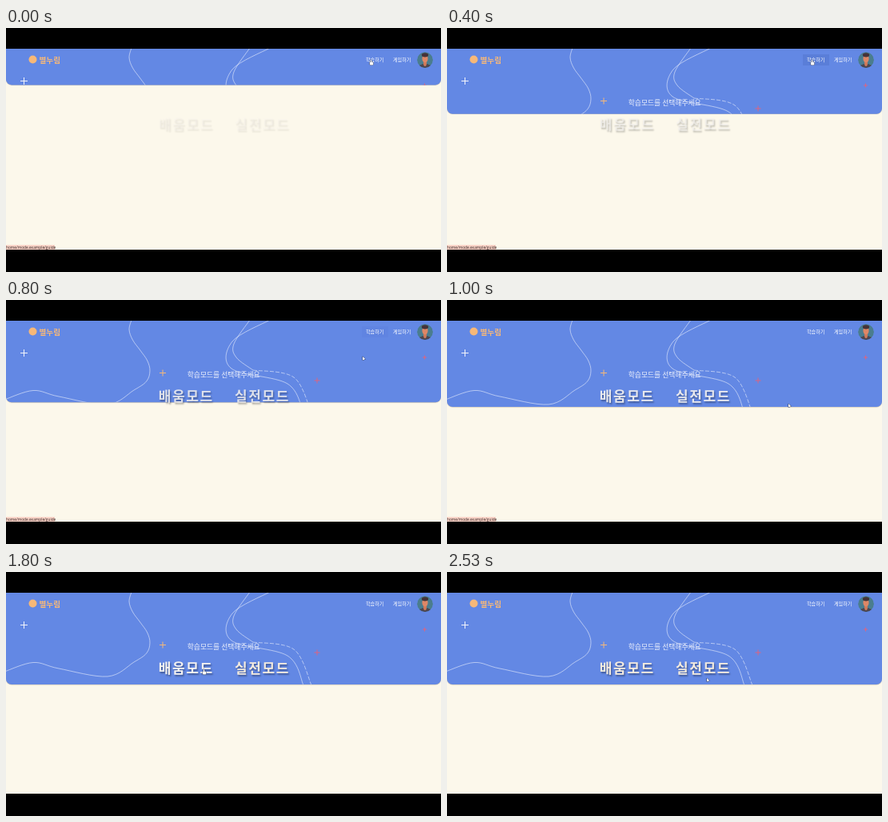
These frames come from a looping animation (544x306 px, 2.59 s). An HTML page with a canvas:

```html
<!DOCTYPE html>
<html lang="ko">
<head>
<meta charset="utf-8">
<style>
html, body { margin: 0; width: 100%; height: 100%; overflow: hidden; background: #000; }
canvas { display: block; width: 544px; height: 306px; }
</style>
</head>
<body>
<canvas id="stage" width="544" height="306"></canvas>
<script>
const ctx = document.getElementById('stage').getContext('2d');
const LOOP = 2590, STEP = 200 / 3;
const FONT = '"Noto Sans CJK KR", "Noto Sans CJK", "Noto Sans", sans-serif';
const CREAM = '#fcf8eb', BLUE = '#6388e4', ORANGE = '#f7b878', RED = '#dc6480';

// Upper part of the left line: one half wave running down the panel
const wave = Array.from({ length: 7 }, (_, i) => {
  const y = 24 + 13 * i;
  return [167 - 13 * Math.cos((y - 36) / 52 * Math.PI), y];
});
const leftTrail = [...wave, [160, 113], [127, 131], [66, 121], [34, 113.5], [-2, 125]];
const innerTrail = [[330, 25], [283, 52], [282, 86], [352, 105], [372, 142]];
const outerTrail = [[305, 25], [285, 55], [288, 72], [309, 88]];
const dashedTrail = [[309, 88], [360, 97], [382, 142]];

// The pointer glides to each stop and arrives at the given time
const GLIDE = 330;
const stops = [
  { at: 0, x: 456, y: 40 },
  { at: 1000, x: 427, y: 130 },
  { at: 1400, x: 335, y: 126 },
  { at: 1800, x: 247, y: 122 },
  { at: 2400, x: 325, y: 133 },
];

const ramp = (t, from, length) => Math.max(0, Math.min(1, (t - from) / length));
const smooth = v => v * v * (3 - 2 * v);
const lerp = (a, b, k) => a + (b - a) * k;

// CSS "ease": cubic-bezier(.25, .1, .25, 1)
function ease(x) {
  if (x >= 1) return 1;
  const bezier = (a, b, u) => 3 * a * u * (1 - u) ** 2 + 3 * b * u * u * (1 - u) + u ** 3;
  let lo = 0, hi = 1;
  for (let i = 0; i < 24; i++) {
    const mid = (lo + hi) / 2;
    if (bezier(.25, .25, mid) < x) lo = mid; else hi = mid;
  }
  return bezier(.1, 1, lo);
}

function disc(x, y, rx, ry, color) {
  ctx.fillStyle = color;
  ctx.beginPath();
  ctx.ellipse(x, y, rx, ry, 0, 0, Math.PI * 2);
  ctx.fill();
}

function text(str, x, y, size, color, weight = 400) {
  ctx.font = `${weight} ${size}px ${FONT}`;
  ctx.fillStyle = color;
  ctx.fillText(str, x, y);
}

// Smooth line through all points (Catmull-Rom)
function trail(points, dash = []) {
  const at = i => points[Math.max(0, Math.min(points.length - 1, i))];
  ctx.beginPath();
  ctx.moveTo(...points[0]);
  for (let i = 0; i < points.length - 1; i++) {
    const [a, b, c, d] = [at(i - 1), at(i), at(i + 1), at(i + 2)];
    ctx.bezierCurveTo(b[0] + (c[0] - a[0]) / 6, b[1] + (c[1] - a[1]) / 6,
      c[0] - (d[0] - b[0]) / 6, c[1] - (d[1] - b[1]) / 6, c[0], c[1]);
  }
  ctx.setLineDash(dash);
  ctx.strokeStyle = 'rgba(255,255,255,.8)';
  ctx.lineWidth = .65;
  ctx.stroke();
  ctx.setLineDash([]);
}

function plus(x, y, r, color) {
  ctx.strokeStyle = color;
  ctx.lineWidth = 1;
  ctx.beginPath();
  ctx.moveTo(x - r, y);
  ctx.lineTo(x + r, y);
  ctx.moveTo(x, y - r);
  ctx.lineTo(x, y + r);
  ctx.stroke();
}

function panelPath(bottom) {
  ctx.beginPath();
  ctx.roundRect(0, 26, 544, bottom - 26, [0, 0, 7, 7]);
}

function avatar() {
  ctx.save();
  ctx.beginPath();
  ctx.arc(524, 40, 10, 0, Math.PI * 2);
  ctx.clip();
  disc(524, 40, 10, 10, '#4a7d8e');
  disc(524, 50, 8.5, 5, '#4b4650');
  disc(524, 44, 2, 4, '#cf7a5a');
  disc(524, 38.5, 3.6, 4.8, '#de8766');
  disc(524, 33.8, 4.2, 2.6, '#453338');
  ctx.restore();
}

function panel(bottom, hover) {
  ctx.save();
  ctx.shadowColor = 'rgba(70,55,40,.35)';
  ctx.shadowBlur = 1;
  ctx.shadowOffsetY = .4;
  ctx.fillStyle = BLUE;
  panelPath(bottom);
  ctx.fill();
  ctx.restore();

  ctx.save();
  panelPath(bottom);
  ctx.clip();
  trail(leftTrail);
  trail(innerTrail);
  trail(outerTrail);
  trail(dashedTrail, [5, 2]);
  plus(22.5, 66.5, 4.5, '#f3f4fb');
  plus(196, 91.5, 4, ORANGE);
  plus(389, 101, 3.5, RED);
  plus(523.5, 72, 2.5, RED);
  text('학습모드를 선택해주세요', 226.7, 96.7, 8.8, '#eef1fc');
  ctx.restore();

  disc(33.5, 39.5, 5, 5, ORANGE);
  text('별누림', 41.5, 44, 9.6, ORANGE, 700);
  ctx.fillStyle = `rgba(72,104,190,${.3 * hover})`;
  ctx.fillRect(445, 33, 33, 14);
  text('학습하기', 450, 42.3, 6.1, '#fff');
  text('게임하기', 484, 42.3, 6.1, '#fff');
  avatar();
}

function title(str, x, opacity, tint) {
  ctx.save();
  ctx.globalAlpha = opacity;
  ctx.letterSpacing = '1.6px';
  ctx.shadowColor = 'rgba(0,0,0,.35)';
  ctx.shadowBlur = 2;
  ctx.shadowOffsetX = ctx.shadowOffsetY = 1.2;
  text(str, x, 127.3, 17, `rgb(244, ${lerp(242, 235, tint)}, ${lerp(240, 222, tint)})`, 700);
  ctx.restore();
}

function pointerAt(t) {
  let { x, y } = stops[0];
  for (const stop of stops.slice(1)) {
    const k = smooth(ramp(t, stop.at - GLIDE, GLIDE));
    x = lerp(x, stop.x, k);
    y = lerp(y, stop.y, k);
  }
  return [x, y];
}

function pointer(x, y) {
  const overNav = y < 47 && x > 445 && x < 478;
  const overTitle = y > 111 && y < 131 && (x > 191 && x < 259 || x > 286 && x < 354);
  ctx.beginPath();
  if (overNav || overTitle) {
    ctx.roundRect(x - .2, y, 1.4, 5, .6);
    ctx.roundRect(x - 1.2, y + 2.8, 4.6, 3.6, 1.2);
  } else {
    ctx.moveTo(x, y);
    ctx.lineTo(x, y + 4.6);
    ctx.lineTo(x + 3.3, y + 3.2);
    ctx.closePath();
  }
  ctx.lineWidth = .9;
  ctx.strokeStyle = '#26304f';
  ctx.stroke();
  ctx.fillStyle = '#fff';
  ctx.fill();
}

function statusBar() {
  ctx.fillStyle = '#f8d3c7';
  ctx.fillRect(0, 272, 61, 6);
  ctx.font = '4.8px "Open Sans", sans-serif';
  ctx.fillStyle = '#3c2826';
  ctx.fillText('home/mode.example/guide', 0, 276.8);
}

function draw(t) {
  // The opening transition is already under way when the loop starts
  const progress = ease(t / 2000 + .157);
  ctx.fillStyle = '#000';
  ctx.fillRect(0, 0, 544, 306);
  ctx.fillStyle = CREAM;
  ctx.fillRect(0, 26, 544, 252);

  panel(lerp(54, 141.1, progress), ramp(t, 0, 200) - ramp(t, 700, 150));
  title('배움모드', 190.8, progress, ramp(t, 1800, 300));
  title('실전모드', 286, progress, ramp(t, 1400, 300));
  if (t < 1130) statusBar();
  pointer(...pointerAt(t));
}

function tick(now) {
  const t = now % LOOP;
  const start = n => Math.round(n * STEP / 10) * 10;
  let step = Math.floor(t / STEP) + 1;
  while (start(step) > t) step--;
  draw(start(step));
  requestAnimationFrame(tick);
}

draw(0);
requestAnimationFrame(tick);
</script>
</body>
</html>
```
